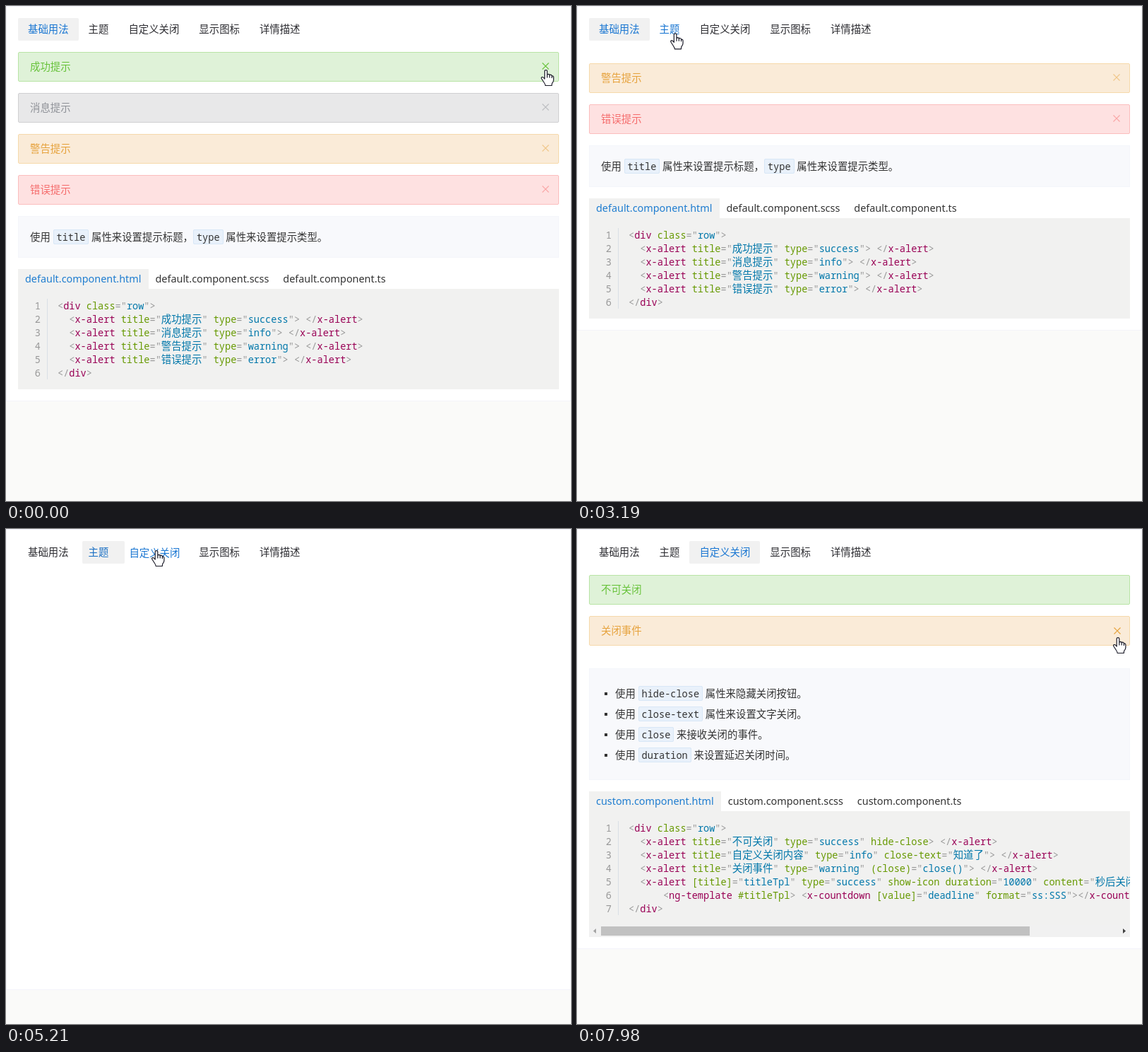
These frames come from a looping animation (800x700 px, 8 s). An HTML page:

```html
<!DOCTYPE html>
<html lang="zh-CN">
<head>
<meta charset="utf-8">
<title>Alert</title>
<style>
* { box-sizing: border-box; }
html, body { margin: 0; width: 100%; height: 100%; overflow: hidden; background: #fafaf9; }
body { position: relative; color: #333; font: 14.4px/20px "Noto Sans", "Noto Sans CJK SC", sans-serif; white-space: nowrap; }
#panel { position: relative; width: 800px; padding: 16px; overflow: hidden; background: #fff; border: 1px solid #f3f3fa; }
#nav { position: relative; display: flex; height: 32px; margin-bottom: 16px; }
#nav span { position: relative; padding: 0 14px; line-height: 32px; }
#mark { position: absolute; top: 0; height: 32px; border-radius: 2px; background: #f1f1f1; }
.slot { height: 42px; margin-bottom: 16px; overflow: hidden; }
.alert { position: relative; height: 42px; padding: 0 16px; line-height: 40px; border: 1px solid; border-radius: 2px; }
.success { color: #67c23a; background: #dff2d8; border-color: #b9e4a5; }
.info { color: #909399; background: #e8e8e9; border-color: #d0d0d2; }
.warning { color: #e6a23c; background: #faebd8; border-color: #f6d9ab; }
.error { color: #f56c6c; background: #fee1e1; border-color: #fbbebe; }
.dark .alert { color: #fff; }
.dark .success { background: #67c23a; }
.dark .info { background: #909399; }
.dark .warning { background: #e6a23c; }
.dark .error { background: #f56c6c; }
.close { position: absolute; right: 6px; top: 6.5px; width: 24px; height: 24px; line-height: 24px; }
.close.words { right: 10px; width: auto; font-size: 12.8px; }
.close svg { display: block; }
.doc { padding: 14px 16px; line-height: 29px; background: #f8f9fc; border: 1px solid #f4f6fa; }
.doc.list { margin-top: 32px; padding: 20px 16px; }
.list div { position: relative; padding-left: 20px; }
.list div::before { content: ""; position: absolute; left: 5px; top: 13px; width: 4px; height: 4px; background: #333; }
code, .code { font-family: "Noto Sans Mono", "Noto Sans CJK SC", monospace; font-size: 13.6px; }
code { padding: 0 4px; background: #e9f1fb; border: 1px solid #d8e7f6; border-radius: 2px; }
.files { display: flex; height: 28px; margin-top: 16px; line-height: 28px; }
.files span { padding: 0 10px; }
.files span:first-child { color: #1f7dd0; background: #f1f1f0; }
.code { position: relative; padding: 14px 0; overflow: hidden; background: #f1f1f0; }
.line { height: 19px; line-height: 19px; white-space: pre; }
.line span:first-child { display: inline-block; width: 42px; height: 19px; margin-right: 14px; padding-right: 9px; text-align: right; color: #999; border-right: 1px solid #d9dfe6; vertical-align: top; }
.line b { font-weight: 400; font-size: 14.4px; line-height: 0; }
.p { color: #999; } .tag { color: #905; } .attr { color: #690; } .val { color: #07a; }
.scroll { display: block; margin-bottom: -14px; margin-top: 14px; }
#cursor { position: absolute; left: 0; top: 0; overflow: visible; }
#cursor path { fill: #fff; stroke: #1b1b28; stroke-width: 1.2; stroke-linejoin: round; }
</style>
</head>
<body>
<div id="panel"><div id="nav"><div id="mark"></div></div></div>
<svg id="cursor" width="1" height="1">
  <path id="hand" d="M-1.8 2Q-1.8 .6 0 .6Q1.8 .6 1.8 2V7.6Q2 6.3 3.5 6.3Q5 6.4 5.2 8Q5.6 7 6.8 7.2Q8.2 7.4 8.4 9Q10.8 8.4 10.9 11V14.5Q10.9 17 8.9 19Q8.3 20 8.3 22.5H-.8Q-1 20.5 -2.5 18.5L-6 13Q-7 11.2 -5.6 10.6Q-4.4 10.2 -3 11.6L-1.8 13ZM1.8 7.6V11.5M5.2 8V11.5M8.4 9V12"/>
  <path id="arrow" d="M.5 .5V16.3L4.1 12.9L6.4 18.3L8.8 17.3L6.5 12H11.4Z"/>
</svg>
<script>
const LOOP = 8000;
const TABS = ['基础用法', '主题', '自定义关闭', '显示图标', '详情描述'];
const TYPES = ['success', 'info', 'warning', 'error'];
const HINTS = ['成功提示', '消息提示', '警告提示', '错误提示'];
const tagLines = extra => ['<div class="row">',
  ...HINTS.map((h, i) => `  <x-alert title="${h}" type="${TYPES[i]}"${extra}> </x-alert>`), '</div>'];

const PAGES = [
  { name: 'default', start: -1e4, titles: HINTS, code: tagLines(''),
    doc: ['使用 `title` 属性来设置提示标题，`type` 属性来设置提示类型。'] },
  { name: 'effect', start: 3402, titles: HINTS, code: tagLines(' effect="dark"'), dark: true,
    doc: ['使用 `effect` 属性来切换显示风格。'] },
  { name: 'custom', start: 5192, titles: ['不可关闭', '自定义关闭内容', '关闭事件'], closers: ['', '知道了'], scroll: true,
    doc: ['使用 `hide-close` 属性来隐藏关闭按钮。', '使用 `close-text` 属性来设置文字关闭。',
      '使用 `close` 来接收关闭的事件。', '使用 `duration` 来设置延迟关闭时间。'],
    code: ['<div class="row">',
      '  <x-alert title="不可关闭" type="success" hide-close> </x-alert>',
      '  <x-alert title="自定义关闭内容" type="info" close-text="知道了"> </x-alert>',
      '  <x-alert title="关闭事件" type="warning" (close)="close()"> </x-alert>',
      '  <x-alert [title]="titleTpl" type="success" show-icon duration="10000" content="秒后关闭"> </x-alert>',
      '      <ng-template #titleTpl> <x-countdown [value]="deadline" format="ss:SSS"></x-countdown></ng-template>',
      '</div>'] }
];

// page, alert, start time, whether the margin below stays
const CLOSINGS = [[0, 0, 1340, true], [0, 1, 2350, false], [2, 1, 6830, false]];
const PRESSES = [[1290, 1380], [2300, 2380], [3330, 3410], [5150, 5260], [6760, 6840], [7940, 8000]];
// time, x, y of the pointer tip
const PATH = [[380, 764.5, 90], [530, 788, 95], [800, 661, 78], [1090, 764, 87], [1240, 764, 87], [1300, 763, 85],
  [1940, 763, 85], [2090, 765, 95], [2520, 765, 95], [3220, 136, 38], [3640, 136, 38], [4200, 655, 80],
  [4350, 655, 80], [5090, 213, 30], [5900, 213, 30], [6280, 679, 141], [6620, 753, 142],
  [7180, 753, 142], [7850, 766, 153]];

const $ = id => document.getElementById(id);
const panel = $('panel'), nav = $('nav'), mark = $('mark');
const span = (cls, text) => `<span class="${cls}">${text}</span>`;
const CROSS = '<svg width="24" height="24"><path d="M7.5 7.5l9 9m0-9l-9 9" fill="none" stroke="currentColor" stroke-width="1.2"/></svg>';
const SCROLLBAR = '<svg class="scroll" width="766" height="17"><path d="M0 0H766V17H0Z" fill="#f1f1f1"/>' +
  '<path d="M17 2H624V15H17Z" fill="#c1c1c1"/><path d="M10 5V12L6 8.5Z" fill="#a3a3a3"/><path d="M756 5V12L760 8.5Z" fill="#404040"/></svg>';

function highlight(line) {
  return line.replace(/(<\/?)([\w-]+)|"([^"]*)"|([>=])|([^\s<>="]+)/g, (all, open, tag, value, mark, attr) =>
    tag ? span('p', open.replace('<', '&lt;')) + span('tag', tag)
    : value ? span('p', '"') + span('val', value.replace(/[\u4e00-\u9fa5]+/g, '<b>$&</b>')) + span('p', '"')
    : mark ? span('p', mark.replace('>', '&gt;')) : span('attr', attr));
}

function buildPage(page) {
  const el = document.createElement('div');
  if (page.dark) el.className = 'dark';
  const closer = i => {
    const label = page.closers?.[i];
    return label === '' ? '' : `<div class="close${label ? ' words' : ''}">${label || CROSS}</div>`;
  };
  const doc = page.doc.map(d => `<div>${d.replace(/`(.*?)`/g, '<code>$1</code>')}</div>`).join('');
  el.innerHTML =
    page.titles.map((t, i) => `<div class="slot"><div class="alert ${TYPES[i]}">${t}${closer(i)}</div></div>`).join('') +
    `<div class="doc${page.doc.length > 1 ? ' list' : ''}">${doc}</div>` +
    '<div class="files">' + ['html', 'scss', 'ts'].map(e => `<span>${page.name}.component.${e}</span>`).join('') + '</div>' +
    '<div class="code">' + page.code.map((l, i) => `<div class="line"><span>${i + 1}</span>${highlight(l)}</div>`).join('') +
    (page.scroll ? SCROLLBAR : '') + '</div>';
  panel.append(el);
  page.el = el;
  page.slots = [...el.querySelectorAll('.slot')];
  page.closeEls = [...el.querySelectorAll('.close')];
}

const tabs = TABS.map(text => {
  const el = document.createElement('span');
  el.textContent = text;
  nav.append(el);
  return el;
});
const tabWidth = i => TABS[i].length * 14.4 + 28;
const tabLeft = i => i ? tabLeft(i - 1) + tabWidth(i - 1) : 0;
PAGES.forEach(buildPage);

const clamp = v => Math.min(1, Math.max(0, v));
const mix = (a, b, k) => a + (b - a) * k;

// CSS "ease" curve
function ease(v) {
  v = clamp(v);
  if (v === 0 || v === 1) return v;
  let lo = 0, hi = 1, s;
  for (let i = 0; i < 24; i++) {
    s = (lo + hi) / 2;
    if (.75 * s * (1 - s) + s ** 3 < v) lo = s; else hi = s;
  }
  return .3 * s * (1 - s) ** 2 + 3 * s * s * (1 - s) + s ** 3;
}

function pointerAt(t) {
  const next = PATH.findIndex(p => p[0] > t);
  if (next === 0) return PATH[0].slice(1);
  if (next < 0) return PATH.at(-1).slice(1);
  const [t0, x0, y0] = PATH[next - 1], [t1, x1, y1] = PATH[next];
  const u = (t - t0) / (t1 - t0), k = u * u * (3 - 2 * u);
  return [mix(x0, x1, k), mix(y0, y1, k)];
}

function render(t) {
  const current = PAGES.findLastIndex(p => t >= p.start);
  const page = PAGES[current], age = t - page.start;
  const [x, y] = pointerAt(t);
  const pressed = PRESSES.some(([a, b]) => t >= a && t < b);
  const hits = el => {
    const r = el.getBoundingClientRect();
    return x >= r.left && x < r.right && y >= r.top && y < r.bottom;
  };

  PAGES.forEach((p, i) => p.el.style.display = i === current ? '' : 'none');
  const enter = ease(age / 313);
  page.el.style.transform = enter < 1 ? `translateX(${2000 * (1 - enter)}px)` : '';
  page.el.style.opacity = enter;

  for (const [p, i, start, keepsMargin] of CLOSINGS) {
    const slot = PAGES[p].slots[i], left = 1 - ease((t - start) / 230);
    slot.style.height = 42 * left + 'px';
    slot.style.marginBottom = (keepsMargin ? 16 : 16 * left) + 'px';
    slot.style.opacity = left;
  }

  const move = ease(age / 200), from = Math.max(0, current - 1);
  mark.style.left = mix(tabLeft(from), tabLeft(current), move) + 'px';
  mark.style.width = mix(tabWidth(from), tabWidth(current), move) + 'px';

  let hand = false;
  const press = (el, over) => {
    hand ||= over;
    el.style.transform = over && pressed ? 'translate(1px, 1px)' : '';
  };
  tabs.forEach((el, i) => {
    el.style.transform = '';
    const over = hits(el);
    const blue = over ? 1 : i === current ? move : i === from ? 1 - move : 0;
    el.style.color = `rgb(${mix(45, 25, blue)}, ${mix(45, 118, blue)}, ${mix(50, 210, blue)})`;
    press(el, over);
  });
  page.closeEls.forEach(el => {
    el.style.transform = '';
    const over = hits(el);
    el.style.opacity = over ? 1 : .5;
    press(el, over);
  });

  $('hand').style.display = hand ? '' : 'none';
  $('arrow').style.display = hand ? 'none' : '';
  $('cursor').style.transform = `translate(${x}px, ${y}px)`;
}

const origin = performance.now();
function tick() {
  render((performance.now() - origin) % LOOP);
  requestAnimationFrame(tick);
}
tick();
</script>
</body>
</html>
```
